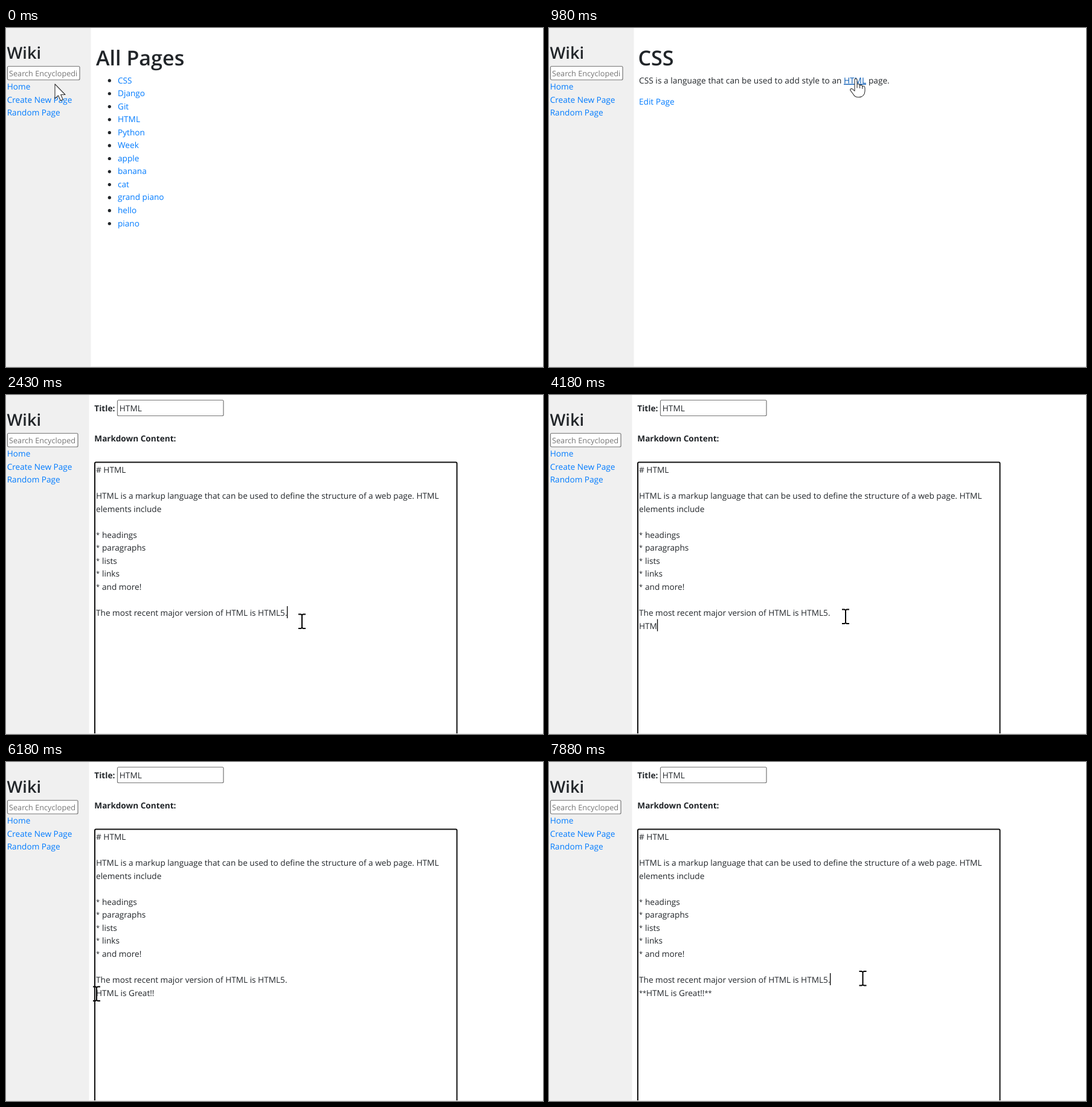
Write an HTML page that moves like this. It is 889 px wide and 562 px high and loops after 8000 ms.

```html
<!DOCTYPE html>
<html lang="en">
<head>
<meta charset="utf-8">
<title>Wiki</title>
<style>
  html, body { margin: 0; width: 100%; height: 100%; overflow: hidden; background: #fff; }
  svg { display: block; }
  text { font: 13.63px "Open Sans", "Noto Sans", sans-serif; fill: #212529; white-space: pre; text-rendering: geometricPrecision; }
  .h1 { font-size: 34.1px; font-weight: 600; }
  .h2 { font-size: 27.3px; font-weight: 600; }
  .bold { font-weight: 700; }
  .link { fill: #007bff; }
  .hover .target { fill: #0056b3; text-decoration: underline; }
  .hint { font-size: 12.7px; fill: #757575; }
  .star { font-size: 11px; }
  .field { fill: #fff; stroke: #767676; stroke-width: 1.2; }
  .pointer { fill: #fff; stroke: #333; stroke-width: 1.1; stroke-linejoin: round; }
  .beam { fill: none; stroke: #000; stroke-width: 2; }
</style>
</head>
<body>
<svg id="stage" width="889" height="562" viewBox="0 0 889 562"></svg>
<script>
const LOOP = 8000, LINE = 21.55, LEFT = 149, STAR = 6, BLINK = 265;
const OPEN_CSS = 470, OPEN_HTML = 1100, OPEN_EDITOR = 1900;
const NEWLINE = 3030, TO_START = 6200, TO_END = 6965, TO_ABOVE = 7800;

const txt = (x, y, s, cls = '') => `<text x="${x}" y="${y}" class="${cls}">${s}</text>`;
const row = n => 129 + LINE * n;
const list = (items, y, cls = '') => items.map((s, i) => {
  const base = y + LINE * i;
  return `<circle cx="171.3" cy="${base - 4.3}" r="2.6" fill="#212529"/>` +
    txt(185, base, s, cls + (i ? '' : ' target'));
}).join('');
const group = (id, body) => `<g id="${id}">${body}</g>`;

const pages = ['CSS', 'Django', 'Git', 'HTML', 'Python', 'Week', 'apple', 'banana', 'cat', 'grand piano', 'hello', 'piano'];
const elements = ['headings', 'paragraphs', 'lists', 'links', 'and more!'];
const intro = 'HTML is a markup language that can be used to define the structure of a web page. HTML';
const recent = 'The most recent major version of HTML is HTML5.';

const sidebar = `<rect id="side" height="562" fill="#f0f0f0"/>` +
  txt(1.5, 50.5, 'Wiki', 'h2') +
  `<rect id="search" class="field" x="2.5" y="63.5" height="22.5" rx="2"/>
   <svg id="clip" x="3" y="60" height="30" overflow="hidden">${txt(2, 20.3, 'Search Encyclopedia', 'hint')}</svg>` +
  ['Home', 'Create New Page', 'Random Page'].map((s, i) => txt(1.7, 102.3 + 21.3 * i, s, 'link')).join('');

const indexPage = txt(149, 62, 'All Pages', 'h1') + list(pages, 91.5, 'link');

const cssPage = txt(147.5, 62, 'CSS', 'h1') +
  `<g letter-spacing=".07">${txt(LEFT, 91.7, 'CSS is a language that can be used to add style to an')}</g>` +
  txt(488, 91.7, 'HTML', 'link target') + txt(529, 91.7, 'page.') +
  txt(LEFT, 127.3, 'Edit Page', 'link');

const htmlPage = txt(147.5, 62, 'HTML', 'h1') +
  txt(LEFT, 91.7, intro + ' elements include') +
  list(elements, 127.5).replace(/ target/g, '') +
  txt(LEFT, 249.7, recent) + txt(LEFT, 285.5, 'Edit Page', 'link target');

const editor = txt(146.3, 27, 'Title:', 'bold') +
  `<rect class="field" x="184.5" y="8.5" width="175.5" height="26" rx="2"/>` + txt(187.8, 27, 'HTML') +
  txt(146.3, 76.7, 'Markdown Content:', 'bold') +
  `<rect x="147" y="111.5" width="599.5" height="470" rx="2" fill="#fff" stroke="#101010" stroke-width="2"/>
   <g id="flashEditor"></g>` +
  txt(LEFT, row(0), '# HTML') + txt(LEFT, row(2), intro) + txt(LEFT, row(3), 'elements include') +
  elements.map((s, i) => txt(LEFT, row(5 + i) - 1, '*', 'star') + txt(159, row(5 + i), s)).join('') +
  txt(LEFT, row(11), recent) +
  `<text id="typed" y="${row(12)}"></text>
   <g id="stars">${[0, 1, 2, 3].map(() => txt(0, row(12) - 1, '*', 'star')).join('')}</g>
   <rect id="caret" width="1.3" height="20" fill="#000"/>`;

const shapes = {
  arrow: `<path class="pointer" d="M0 0V24L5.5 19L9.5 27.5L13.3 25.8L9.7 17.5H17Z"/>`,
  hand: `<path class="pointer" d="M-2 2.2Q-2 0 0 0T2 2.2V10Q2.3 8.6 4.3 8.8Q6.5 9.2 6.5 12Q7 10.2 8.8 10.4Q10.8 10.8 10.8 13.5
    Q11.6 12 13 12.3Q15 12.8 15 15.5V20.5Q14.5 30.5 4.5 30.8Q-1.5 31-4.5 25.5L-9.2 19.2Q-9.6 16-6 16.8L-2 20.3Z
    M2 10V15.5M6.5 12V16M10.8 13.5V17"/>`,
  beam: `<path class="beam" d="M-6-11.5H-2L0-10.3L2-11.5H6M0-10.5V11M-6 12H-2L0 10.8L2 12H6"/>`
};

const $ = id => document.getElementById(id);
$('stage').innerHTML = sidebar + group('index', indexPage) + group('css', cssPage) +
  group('html', htmlPage) + group('editor', editor) +
  `<circle id="flash" r="18" fill="#fbec3c" opacity=".82"/>` +
  group('cursor', Object.keys(shapes).map(k => group(k, shapes[k])).join('')) +
  `<rect y="561" width="889" height="1" fill="#e6e6e6"/>`;
$('flashEditor').remove();

// time, x, y, shape shown from that time on
const path = [
  [0, 81, 93, 'arrow'], [30, 81, 93, 'arrow'], [280, 188, 90, 'hand'], [350, 196, 87, 'hand'],
  [OPEN_CSS, 197, 87, 'beam'], [520, 206, 90, 'beam'], [710, 566, 84, 'arrow'], [770, 520, 84, 'hand'],
  [830, 508, 84, 'hand'], [OPEN_HTML, 508, 84, 'beam'], [1150, 490, 98, 'arrow'],
  [1430, 180, 282, 'hand'], [1490, 168, 284, 'hand'], [1650, 168, 284, 'hand'], [1740, 165.5, 283, 'hand'],
  [OPEN_EDITOR, 166, 283, 'beam'], [2420, 490, 375, 'beam'], [2450, 490, 375, 'beam'],
  [2490, 491, 367, 'beam'], [5590, 491, 367, 'beam'], [5640, 111, 372, 'arrow'], [5680, 111, 372, 'arrow'],
  [5850, 97, 394, 'arrow'], [6050, 128, 387, 'arrow'], [6120, 147, 384, 'beam'], [6180, 150, 384, 'beam'],
  [6250, 150, 384, 'beam'], [6310, 174, 389, 'beam'], [6780, 174, 389, 'beam'], [6920, 290, 381.5, 'beam'],
  [7570, 290, 381.5, 'beam'], [7780, 519.5, 358.5, 'beam'], [LOOP, 519.5, 358.5, 'beam']
];
const clicks = [[370, 460], [1000, 1090], [1800, 1880], [2460, 2550], [6190, 6270], [6930, 7000], [7790, 7870]];

const phrase = 'HTML is Great!!';
const keys = [3570, 3710, ...Array.from({ length: 11 }, (_, i) => 4180 + 76 * i), 5290, 5370];
const headKeys = [6440, 6510], tailKeys = [7280, 7330];
const caretResets = [OPEN_EDITOR, 2555, NEWLINE, ...keys, TO_START, ...headKeys, TO_END, ...tailKeys, TO_ABOVE];

const passed = (times, t) => times.filter(k => k <= t).length;
const show = (node, on) => { node.style.display = on ? '' : 'none'; };

function cursorAt(t) {
  let i = path.length - 2;
  while (i && path[i][0] > t) i--;
  const [t0, x0, y0, kind] = path[i], [t1, x1, y1] = path[i + 1];
  const u = (t - t0) / (t1 - t0), e = u * u * (3 - 2 * u);
  return { x: x0 + (x1 - x0) * e, y: y0 + (y1 - y0) * e, kind };
}

function drawTyping(t) {
  const head = passed(headKeys, t), tail = passed(tailKeys, t);
  const typed = $('typed'), start = LEFT + STAR * head;
  typed.setAttribute('x', start);
  typed.textContent = phrase.slice(0, passed(keys, t));
  const end = start + (typed.textContent ? typed.getComputedTextLength() : 0);
  [...$('stars').children].forEach((star, i) => {
    const n = i % 2;
    star.setAttribute('x', (i < 2 ? LEFT : end) + STAR * n);
    show(star, n < (i < 2 ? head : tail));
  });

  const above = t < NEWLINE || t >= TO_ABOVE;
  const x = above ? 465 : t >= TO_START && t < TO_END ? start : end + STAR * tail;
  const caret = $('caret');
  caret.setAttribute('x', x);
  caret.setAttribute('y', row(above ? 11 : 12) - 16);
  const last = caretResets[passed(caretResets, t) - 1];
  show(caret, (t - last) % (2 * BLINK) < BLINK);
}

function draw(t) {
  const page = passed([OPEN_CSS, OPEN_HTML, OPEN_EDITOR], t);
  const editing = page === 3;
  const { x, y, kind } = cursorAt(t);

  ['index', 'css', 'html', 'editor'].forEach((id, i) => show($(id), i === page));
  $('stage').classList.toggle('hover', kind === 'hand');
  $('side').setAttribute('width', editing ? 137.5 : 140.5);
  $('search').setAttribute('width', editing ? 116.5 : 119.5);
  $('clip').setAttribute('width', editing ? 113 : 116);
  if (editing) drawTyping(t);

  $('cursor').setAttribute('transform', `translate(${x} ${y})`);
  Object.keys(shapes).forEach(k => show($(k), k === kind));
  $('flash').setAttribute('cx', x - 3);
  $('flash').setAttribute('cy', y - 1);
  show($('flash'), clicks.some(([a, b]) => t >= a && t < b));
}

const begin = performance.now();
function tick() {
  draw((performance.now() - begin) % LOOP);
  requestAnimationFrame(tick);
}
tick();
</script>
</body>
</html>
```
